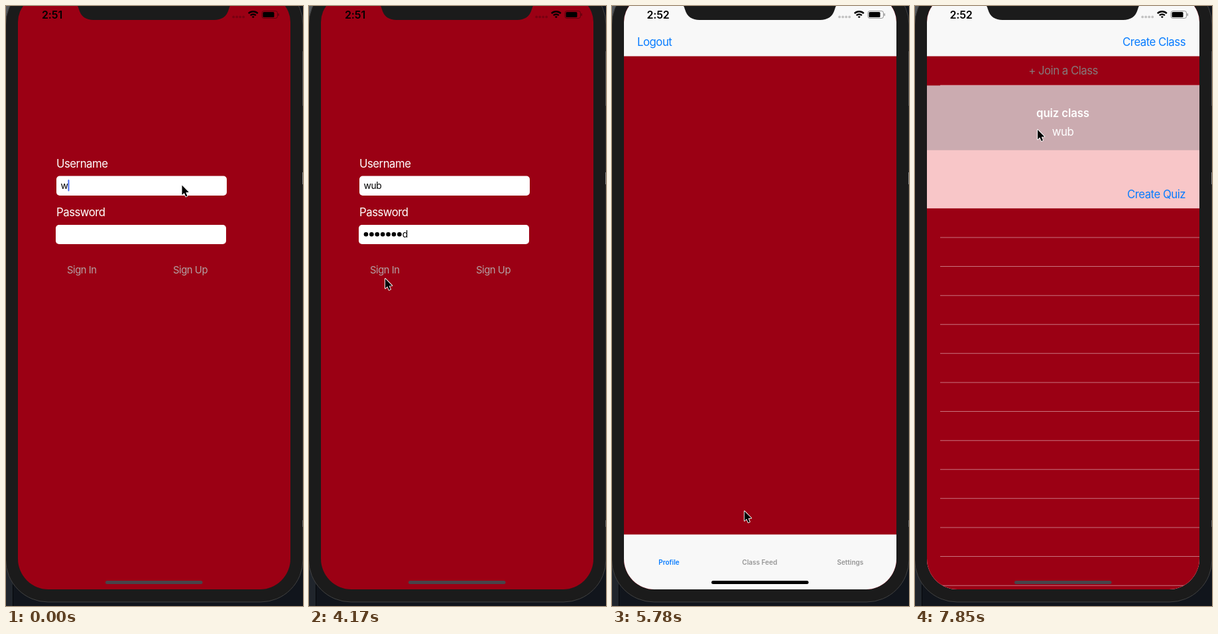
Write an HTML page with a canvas that moves like this. It is 448 px wide and 902 px high and loops after 8 s.

```html
<!DOCTYPE html>
<html lang="en">
<head>
<meta charset="utf-8">
<title>Class app sign-in</title>
<style>
html, body { margin: 0; width: 100%; height: 100%; overflow: hidden; background: #11151c; }
canvas { display: block; width: 448px; height: 902px; }
</style>
</head>
<body>
<canvas id="stage"></canvas>
<script>
const LOOP = 8000, TICK = 148.1;
const LEFT = 18, RIGHT = 429, BOTTOM = 877, HEIGHT = 890;
const RED = '#9b0014', PINK = '#f8c6c8', BAR = '#f8f8f8', BLUE = '#087cff';
const USER = 'wub', AUTHOR = 'Zubo', SECRET = 'password';

const canvas = document.getElementById('stage');
const ctx = canvas.getContext('2d');
const ratio = window.devicePixelRatio || 1;
canvas.width = 448 * ratio;
canvas.height = 902 * ratio;
ctx.scale(ratio, ratio);

// Pointer moves: start, end, target x, target y
const moves = [
  [900, 1333, 262, 347],
  [3720, 4147, 115, 410],
  [4147, 4290, 117, 398],
  [5330, 5924, 215, 826],
  [6660, 7405, 185, 186]
];

const between = (t, a, b) => t >= a && t < b;
const positive = v => v > 0 ? v : 0;

function box(x, y, w, h, color, radius = 0) {
  ctx.fillStyle = color;
  ctx.beginPath();
  ctx.roundRect(x, y, w, h, radius);
  ctx.fill();
}

function text(str, x, y, { size = 16.8, weight = 400, color = '#fff', align = 'left', track = -0.03 } = {}) {
  ctx.font = `${weight} ${size}px Inter, sans-serif`;
  ctx.letterSpacing = `${size * track}px`;
  ctx.textAlign = align;
  ctx.fillStyle = color;
  ctx.fillText(str, x, y);
  return ctx.measureText(str).width;
}

function separator(y, alpha = 0.55) {
  box(38, y - 0.5, RIGHT - 38, 1, `rgba(255,255,255,${alpha})`);
}

function pointerAt(time) {
  let x = 265.5, y = 269.5;
  for (const [start, end, toX, toY] of moves) {
    const p = Math.min(1, positive((time - start) / (end - start)));
    const eased = p * p * (3 - 2 * p);
    x += (toX - x) * eased;
    y += (toY - y) * eased;
  }
  return [x, y];
}

// Remaining distance of a sheet that springs up from below
function sheetOffset(time, start, rate) {
  const s = positive(time - start) / 1000 * rate;
  const rest = HEIGHT * (1 + s) * Math.exp(-s);
  return rest < 1 ? 0 : rest;
}

function caret(x, y) {
  box(x, y, 2, 17.5, '#4a6cf0', 1);
}

function drawLogin(t) {
  const small = { size: 13.9, color: '#000' };
  const faded = { size: 14.8, color: '#b3a1a5' };
  text('Username', 76, 243);
  text('Password', 76, 316);
  box(76, 255.5, 257, 29.5, '#fff', 5);
  box(75, 329, 257, 29, '#fff', 5);

  const name = USER.slice(0, t < 300 ? 1 : t < 600 ? 2 : 3);
  const nameWidth = text(name, 82.5, 275, small);
  if (t < 1050) caret(82.5 + nameWidth, 261);

  const typed = t < 2080 ? 0 : t < 2380 ? 1
    : Math.min(SECRET.length, 2 + (t < 2680 ? 0 : 1 + Math.floor((t - 2680) / 150)));
  let x = 82;
  for (let i = 0; i < typed - 1; i++, x += 8.4) {
    box(x + 0.7, 340, 6.6, 6.6, '#000', 3.3);
  }
  if (typed) x += text(SECRET[typed - 1], x, 348, small);
  if (between(t, 1640, 3870) || between(t, 4310, 4750)) caret(x, 334);

  ctx.globalAlpha = between(t, 4460, 4750) ? 0.3 : 1;
  text('Sign In', 92, 402, faded);
  ctx.globalAlpha = 1;
  text('Sign Up', 252, 402, faded);
}

function drawBars(offset, color, leftItem, rightItem) {
  box(LEFT, offset - 12, RIGHT - LEFT, 87.5, color);
  if (leftItem) text(leftItem, 38, offset + 60, { color: BLUE });
  if (rightItem) text(rightItem, 408, offset + 60, { color: BLUE, align: 'right' });
}

function drawTabs(offset, color, selected) {
  box(LEFT, offset + 794.5, RIGHT - LEFT, 90, color);
  ['Profile', 'Class Feed', 'Settings'].forEach((label, i) =>
    text(label, 86 + i * 136.7, offset + 840, {
      size: 10, weight: 600, align: 'center', track: 0,
      color: i === selected ? BLUE : '#959595'
    }));
}

function drawProfile(offset) {
  const color = offset ? PINK : BAR;
  box(LEFT, offset, RIGHT - LEFT, HEIGHT, RED);
  drawBars(offset, color, 'Logout');
  drawTabs(offset, color, 0);
}

function drawFeed(t) {
  box(LEFT, 0, RIGHT - LEFT, HEIGHT, RED);
  drawBars(0, BAR, '', 'Create Class');
  text('+ Join a Class', 223.5, 103, { color: '#85787b', align: 'center' });
  if (t >= 7710) box(LEFT, 119.5, RIGHT - LEFT, 112.5, t < 7850 ? '#d9d9d9' : '#cbabb0');
  for (let i = 0; i < 7; i++) separator(119.3 + i * 112.55);
  ['quiz class', 'oh boy', 'k', 'Hash Class 7', 'Hash Class 6'].forEach((title, i) => {
    const y = 167 + i * 112.55;
    const by = i === 0 ? USER : t < 6670 ? 'Author' : AUTHOR;
    text(title, 223, y, { weight: 600, align: 'center', track: -0.008 });
    text(by, 223, y + 28.3, { align: 'center' });
  });
  drawTabs(0, BAR, 1);
}

function drawQuizSheet(offset) {
  box(LEFT, offset, RIGHT - LEFT, HEIGHT, RED);
  for (let y = offset + 119.3; y < BOTTOM; y += 43.6) separator(y, 0.45);
  drawBars(offset, PINK, '', 'Create Quiz');
}

function drawStatus(t) {
  text(t < 4750 ? '2:51' : '2:52', 69.5, 19, {
    size: 16, weight: 600, color: '#000', align: 'center', track: -0.01
  });
  for (let i = 0; i < 4; i++) box(341.3 + i * 5, 14.5, 3.8, 3.8, 'rgba(0,0,0,.22)', 1.9);

  ctx.strokeStyle = '#000';
  ctx.lineWidth = 2.4;
  for (const r of [1.6, 5.7, 9.9]) {
    ctx.beginPath();
    ctx.arc(372.8, 18.2, r, -Math.PI * 0.75, -Math.PI * 0.25);
    ctx.stroke();
  }
  ctx.strokeStyle = 'rgba(0,0,0,.4)';
  ctx.lineWidth = 1;
  ctx.beginPath();
  ctx.roundRect(386, 7.5, 23.5, 11, 3);
  ctx.stroke();
  box(387.5, 9, 17, 8, '#000', 1.5);
  box(410.5, 11, 1.4, 4, 'rgba(0,0,0,.4)', 0.7);
}

function drawPhone() {
  box(0, 0, 448, 902, '#11151c');
  box(0, 840, 10, 62, '#20252c');
  box(10, 870, 1, 32, '#05070a');
  box(0, 0, 8, 20, '#55585c');
  box(-0.5, -36, 448.5, 932, '#1b1b1b', 64);
  ctx.strokeStyle = '#414141';
  ctx.lineWidth = 1;
  ctx.stroke();
  box(447, 68, 1, 82, '#555');
  box(447, 250, 1, 18, '#8a8a8a');
  box(447, 773, 1, 10, '#666');
}

function drawNotch() {
  ctx.fillStyle = '#1b1b1b';
  ctx.fill(new Path2D('M107 -1 C109 1 109 2 110 5 C113 16 121 21 132 21 H314 C325 21 333 16 336 5 C337 2 337 1 339 -1 Z'));
}

function drawPointer([x, y]) {
  ctx.save();
  ctx.translate(x, y);
  const arrow = new Path2D('M0 0 V14.5 L3.3 11.5 L5.7 17 L8 16 L5.7 10.7 L10.3 10.4 Z');
  ctx.lineJoin = 'round';
  ctx.lineWidth = 1.8;
  ctx.strokeStyle = '#fff';
  ctx.stroke(arrow);
  ctx.fillStyle = '#000';
  ctx.fill(arrow);
  ctx.restore();
}

function draw(t) {
  const ticked = Math.floor(t / TICK) * TICK;
  drawPhone();
  ctx.save();
  ctx.beginPath();
  ctx.roundRect(LEFT, -16, RIGHT - LEFT, BOTTOM + 16, [40, 40, 46, 46]);
  ctx.clip();
  box(LEFT, -16, RIGHT - LEFT, HEIGHT + 16, RED);
  if (t < 6520) {
    drawLogin(t);
    if (t >= 5050) drawProfile(sheetOffset(ticked, 4880, 15.35));
  } else {
    drawFeed(t);
    if (t >= 7850) drawQuizSheet(sheetOffset(ticked, 7705, 18.4));
  }
  drawStatus(t);
  box(150, 864, 146.5, 5, between(t, 5200, 7850) ? '#000' : '#48444a', 2.5);
  ctx.restore();
  drawNotch();
  drawPointer(pointerAt(ticked));
}

const begin = performance.now();
function frame() {
  draw((performance.now() - begin) % LOOP);
  requestAnimationFrame(frame);
}
frame();
</script>
</body>
</html>
```
